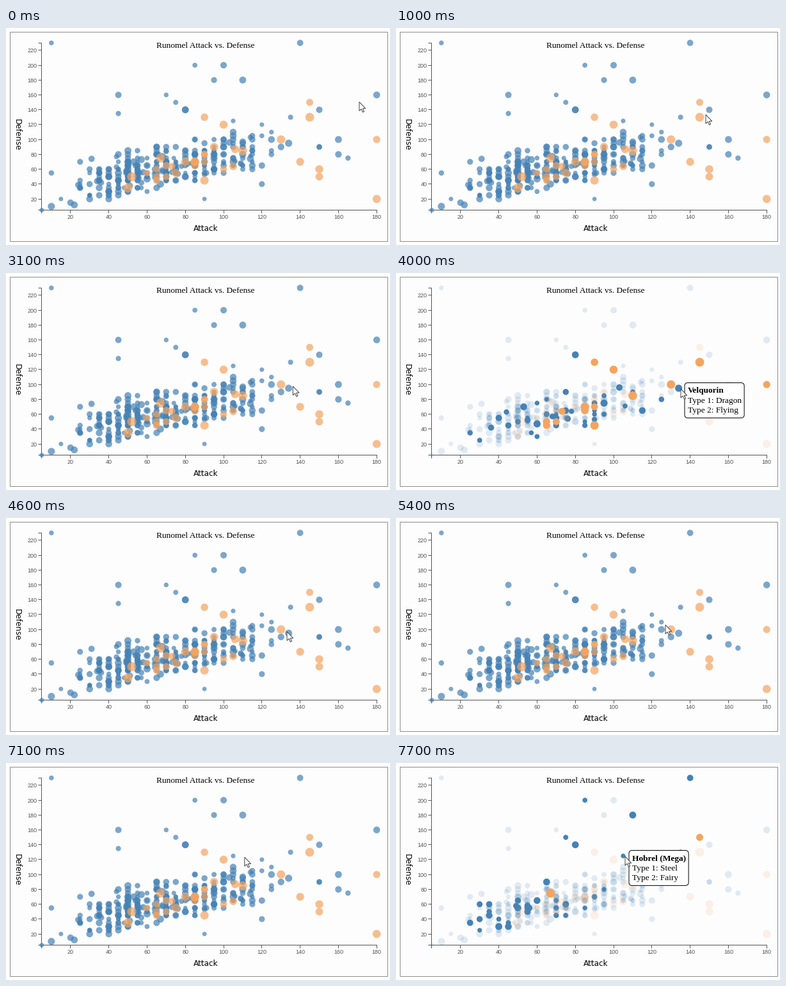
Write a matplotlib script that moves like this. It is 600x339 px and loops after 7800 ms.

```python
import numpy as np
import matplotlib.pyplot as plt
from matplotlib.animation import FuncAnimation
from matplotlib.patches import FancyBboxPatch, Polygon, Rectangle

WIDTH, HEIGHT, DPI = 600, 339, 100
FRAMES, INTERVAL = 78, 100
BLUE, ORANGE, GREY = "steelblue", "sandybrown", "#555555"
RADIUS = {BLUE: 4.6, ORANGE: 6.2}
SERIF, SANS = "Liberation Serif", "Liberation Sans"
AXIS_X, AXIS_Y = 55, 284
rng = np.random.default_rng(12)


def pt(pixels):
    return pixels * 72 / DPI


def px(attack):
    return 41 + 2.99 * attack


def py(defense):
    return 290.3 - 1.161 * defense


def cloud(count, low, peak, high, spread=35):
    """Points rising from lower left to upper right, mostly on multiples of five."""
    attack = rng.triangular(low, peak, high, count)
    defense = 27 + 0.5 * attack + rng.triangular(-28, -4, spread, count)
    step = rng.choice([5, 1], count, p=[0.85, 0.15])
    return list(zip(np.round(attack / step) * step, np.round(defense / step) * step))


# Points far from the crowd or under the mouse, then the crowd, per highlight group.
GROUPS = [
    (BLUE, "solo", [(5, 5), (10, 10), (10, 55), (15, 20), (20, 15), (45, 160), (45, 135),
                    (70, 160), (100, 200), (120, 120), (150, 140), (150, 90), (160, 100),
                    (165, 75), (180, 160)] + cloud(150, 18, 62, 135)),
    (BLUE, "", [(10, 230), (95, 180), (160, 80), (90, 20), (120, 40)]
     + cloud(85, 18, 65, 138)),
    (BLUE, "sky", [(134, 95), (150, 90), (80, 140)] + cloud(44, 18, 60, 138, 28)),
    (BLUE, "metal", [(110, 180), (105, 125), (80, 140), (135, 130)]
     + cloud(20, 18, 45, 115)),
    (BLUE, "metal solo", [(140, 230), (85, 200), (75, 150)] + cloud(9, 18, 45, 105, 20)),
    (ORANGE, "", [(140, 70)] + cloud(4, 75, 95, 115)),
    (ORANGE, "solo", [(180, 20), (150, 60), (150, 50), (95, 90)]
     + cloud(10, 35, 80, 105, 10)),
    (ORANGE, "sky", [(145, 130), (180, 100), (130, 100), (100, 120), (90, 130), (90, 45)]
     + cloud(8, 55, 105, 112, 15)),
    (ORANGE, "metal", [(145, 150), (67, 75)]),
]
points, radii, colors, tags = [], [], [], []
for color, tag, members in GROUPS:
    points += [(px(a), py(d)) for a, d in members]
    radii += list(RADIUS[color] + rng.uniform(-1.2, 1.0, len(members)))
    colors += [color] * len(members)
    tags += [tag.split()] * len(members)

fig = plt.figure(figsize=(WIDTH / DPI, HEIGHT / DPI), dpi=DPI, facecolor="white")
ax = fig.add_axes([0, 0, 1, 1])
ax.set_xlim(0, WIDTH)
ax.set_ylim(HEIGHT, 0)
ax.axis("off")


def label(x, y, text, size, font, **kwargs):
    style = dict(ha="center", va="center", color="black") | kwargs
    return ax.text(x, y, text, fontsize=pt(size), family=font, **style)


def line(x, y):
    ax.plot(x, y, color=GREY, lw=pt(1), zorder=1, solid_capstyle="butt")


ax.add_patch(Rectangle((6, 6), 590, 327, fc="#fdfdfe", ec="#8c8c8c", lw=pt(1), zorder=0))
line([AXIS_X - 5, AXIS_X, AXIS_X, AXIS_X - 5], [23, 23, AXIS_Y, AXIS_Y])
line([AXIS_X, AXIS_X, 579, 579], [AXIS_Y + 5, AXIS_Y, AXIS_Y, AXIS_Y + 5])
for value in range(20, 221, 20):
    y = py(value)
    line([AXIS_X - 5, AXIS_X], [y - 0.5, y - 0.5])
    label(48.5, y, str(value), 9, SANS, ha="right", va="center_baseline", color=GREY)
    if value <= 180:
        x = px(value)
        line([x - 0.5, x - 0.5], [AXIS_Y, AXIS_Y + 5])
        label(x, 295.5, str(value), 9, SANS, color=GREY)
label(311.5, 31, "Runomel Attack vs. Defense", 13.33, SERIF, va="baseline")
label(312, 317, "Attack", 12, "DejaVu Sans", va="baseline")
label(17.5, 167, "Defense", 12, "DejaVu Sans", rotation=-90)

dots = ax.scatter(*zip(*points), s=[pt(2 * r) ** 2 for r in radii], c=colors,
                  linewidths=0, zorder=2)
NORMAL = np.full(len(points), 0.7)

# Mouse path: ms, x, y
PATH = np.array([
    (0, 552, 115.5), (500, 494, 127.5), (1300, 478, 140), (2200, 478, 140),
    (3200, 445, 181), (4500, 445, 181), (4900, 421, 167), (5400, 421, 167),
    (5900, 403, 151.5), (6800, 395, 149), (7300, 358, 146),
])
ARROW = np.array([(0, 0), (0, 14), (3.2, 11), (5.4, 16), (7.6, 15), (5.4, 10.3), (9.8, 10.3)])
cursor = ax.add_patch(Polygon(ARROW, closed=True, fc="white", ec="#444444",
                              lw=pt(1), zorder=6))


def mouse(now):
    return np.array([np.interp(now, PATH[:, 0], PATH[:, k]) for k in (1, 2)])


def tooltip(x, y, name, types):
    lines = [name] + [f"Type {i}: {kind}" for i, kind in enumerate(types, 1)]
    texts = [label(x + 5, y + 16 + 15.3 * i, text, 13.33, SERIF, ha="left",
                   va="baseline", weight="normal" if i else "bold", zorder=5)
             for i, text in enumerate(lines)]
    renderer = fig.canvas.get_renderer()
    width = max(t.get_window_extent(renderer).width for t in texts) + 9
    box = FancyBboxPatch((x, y), width, 15.3 * len(lines) + 9, fc="white", ec="black",
                         lw=pt(1), zorder=4, boxstyle="round,pad=0,rounding_size=5")
    return [ax.add_patch(box), *texts]


def hover(start, end, tag, name, *types):
    """The tooltip opens beside the mouse and stays there until the mouse leaves."""
    x, y = mouse(start) + (6, -9.5)
    opacities = np.array([1.0 if tag in own else 0.15 for own in tags])
    return start, end, opacities, tooltip(x, y, name, types)


HOVERS = [
    hover(500, 1000, "solo", "Krondum", "Ground"),
    hover(1300, 2300, "sky", "Torvandel (Mega)", "Dragon", "Flying"),
    hover(3200, 4600, "sky", "Velquorin", "Dragon", "Flying"),
    hover(5900, 6900, "solo", "Brumdok", "Ground"),
    hover(7300, 7800, "metal", "Hobrel (Mega)", "Steel", "Fairy"),
]


def update(frame):
    now = frame * INTERVAL
    alpha = NORMAL
    for start, end, opacities, artists in HOVERS:
        active = start <= now < end
        if active:
            alpha = opacities
        for artist in artists:
            artist.set_visible(active)
    dots.set_alpha(alpha)
    cursor.set_xy(ARROW + mouse(now))
    return [dots, cursor]


anim = FuncAnimation(fig, update, frames=FRAMES, interval=INTERVAL, repeat=True,
                     repeat_delay=0)
plt.show()
```
